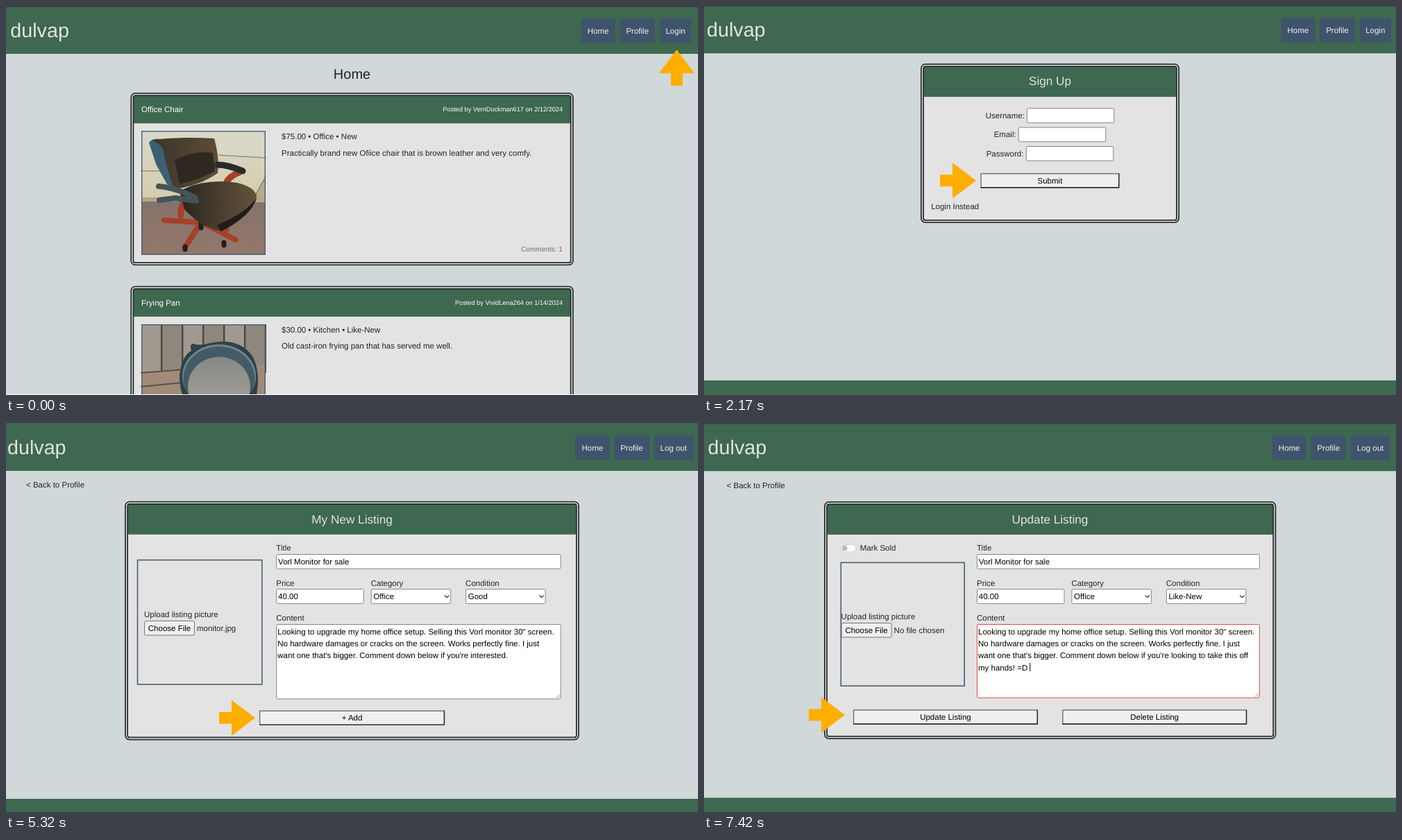
Animation of 997 by 561 pixels, one loop 8000 ms. Source, as an HTML page:

```html
<!DOCTYPE html>
<html lang="en">
<head>
<meta charset="utf-8">
<title>Marketplace walkthrough</title>
<style>
  html, body { margin: 0; width: 100%; height: 100%; overflow: hidden; background: #d0d8d9; }
  svg { display: block; width: 100%; height: 100%; }
  text { font-family: "Liberation Sans", Arial, sans-serif; text-rendering: geometricPrecision; white-space: pre; }
  .status { font-family: Inter, sans-serif; }
</style>
</head>
<body>
<svg id="stage" viewBox="0 0 997 561"></svg>
<script>
const GREEN = '#3e684f', SLATE = '#3f546c', PALE = '#e3e3e3', INK = '#212529', GREY = '#757575', EDGE = '#2b2e31';
const BODY = 11.5, SMALL = 9.2, TITLE = 17.2, HEADING = 20, MIDDLE = 498.5;

// Drawing primitives
const escape = s => s.replace(/&/g, '&amp;').replace(/</g, '&lt;');
const text = (s, x, y, { size = BODY, fill = INK, anchor = 'start', cls = '' } = {}) =>
  `<text x="${x}" y="${y}" font-size="${size}" fill="${fill}" text-anchor="${anchor}" class="${cls}">${escape(s)}</text>`;
const centred = (s, x, y, size = BODY, fill = INK) => text(s, x, y, { size, fill, anchor: 'middle' });
const rightText = (s, x, y, size, fill) => text(s, x, y, { size, fill, anchor: 'end' });
const lines = (rows, x, y, style) => rows.map((s, i) => text(s, x, y + i * 17.3, style)).join('');
const rect = (x, y, w, h, fill, extra = '') =>
  `<rect x="${x}" y="${y}" width="${w}" height="${h}" fill="${fill}" ${extra}/>`;
const frame = (x, y, w, h, stroke, width, fill = 'none', r = 0) =>
  rect(x + width / 2, y + width / 2, w - width, h - width, fill, `stroke="${stroke}" stroke-width="${width}" rx="${r}"`);
const shape = (d, fill) => `<path d="${d}" fill="${fill}"/>`;
const line = (d, stroke, width) =>
  `<path d="${d}" fill="none" stroke="${stroke}" stroke-width="${width}" stroke-linecap="round" stroke-linejoin="round"/>`;
const ellipse = (cx, cy, rx, ry, fill) => `<ellipse cx="${cx}" cy="${cy}" rx="${rx}" ry="${ry}" fill="${fill}"/>`;
const gradient = (id, from, to, dir = 'x2="0" y2="1"') =>
  `<linearGradient id="${id}" ${dir}><stop stop-color="${from}"/><stop offset="1" stop-color="${to}"/></linearGradient>`;

const arrow = (x, y, angle = 0) =>
  `<path transform="translate(${x} ${y}) rotate(${angle})" d="M0 0L-34 -25.7V-8.5H-52V8.5H-34V25.7Z" fill="#ffae00"/>`;

// Page furniture
function page({ header, logoX, navRight, footer, account = 'Log out', topLine = 0 }) {
  const links = [[account, account === 'Login' ? 45.5 : 56.5], ['Profile', 50.5], ['Home', 49]];
  let out = rect(0, 0, 997, 561, '#d0d8d9') + rect(0, 0, 997, header, GREEN) + rect(0, 0, 997, topLine, '#3a403d');
  out += text('dulvap', logoX, header - 24.2, { size: 28.7, fill: PALE });
  let right = navRight;
  for (const [label, w] of links) {
    out += rect(right - w, header - 51.2, w, 35.2, SLATE) + centred(label, right - w / 2, header - 29.5, BODY, '#f0f0f0');
    right -= w + 6.8;
  }
  return out + (footer ? rect(0, footer, 997, 561 - footer, GREEN) : '');
}

const card = (x, y, w, h, headH) =>
  rect(x, y, w, h, PALE, 'rx="6"') + rect(x + 4, y + 4, w - 8, headH, GREEN, 'rx="2"') +
  frame(x, y, w, h, EDGE, 1.8, 'none', 6) + frame(x + 3.2, y + 3.2, w - 6.4, h - 6.4, EDGE, 1.8, 'none', 3);

const button = (label, x, y, w, h = 21.7) =>
  rect(x, y, w, h, '#efefef') + line(`M${x + .8} ${y + h - 1}V${y + .8}H${x + w - 1}`, '#767676', 1.5) +
  line(`M${x + 1} ${y + h - .8}H${x + w - .8}V${y + 1}`, '#2d2d2d', 1.6) +
  centred(label, x + w / 2, y + 14.9, BODY, '#000');

const field = (x, y, w, h = 21.7, value = '', fill = '#000', stroke = '#858585') =>
  frame(x, y, w, h, stroke, 1, '#fff', 1.8) + text(value, x + 2.8, y + 14.9, { fill });

const select = (x, y, value) =>
  field(x, y, 115.5) + text(value, x + 3.6, y + 14.9, { fill: '#000' }) +
  line(`M${x + 106.5} ${y + 9.6}l2.9 2.9l2.9 -2.9`, '#222', 1.2);

const fileChooser = (x, y, chosen) =>
  text('Upload listing picture', x, y) + frame(x, y + 5, 73, 21.5, '#767676', 1, '#efefef', 2) +
  centred('Choose File', x + 36.5, y + 19.8, BODY, '#000') + text(chosen, x + 76, y + 19.8);

// x, y: left edge and baseline of the first label
function listingForm(x, y, w, areaH, v) {
  const fill = v.filled ? '#000' : GREY, right = x + w, bottom = y + 106 + areaH;
  return text('Title', x, y) + field(x, y + 5, w, 21.7, v.title, fill) +
    text('Price', x, y + 50.6) + field(x, y + 55.2, 126.5, 21.7, v.price, fill) +
    text('Category', x + 136.4, y + 50.6) + select(x + 136.4, y + 55.2, v.category) +
    text('Condition', x + 272.8, y + 50.6) + select(x + 272.8, y + 55.2, v.condition) +
    text('Content', x, y + 101.2) + field(x, y + 106, w, areaH, '', fill, v.outline) +
    lines(v.content, x + 2, y + 120.6, { fill }) +
    line(`M${right - 7} ${bottom - 2}l5 -5M${right - 4} ${bottom - 2}l2 -2`, '#666', .7);
}

const listing = ({ x, y, w, h, bodyX, size = BODY, title, by, price, about, comments, picture }) =>
  card(x, y, w, h, 40.3) + text(title, x + 15.7, y + 28, { size, fill: '#fff' }) +
  rightText(by, x + w - 15.7, y + 27.2, SMALL, '#fff') + picture +
  text(price, bodyX, y + 67.3, { size }) + lines(about, bodyX, y + 90.5, { size }) +
  rightText(`Comments: ${comments}`, x + w - 16, y + h - 20.3, 10.05, '#6a7074');

const loginRow = (label, x, y, fieldX) => text(label, x, y) + field(fieldX, y - 14.8, 126.5);

// Pictures, reduced to flat shapes
const chair = () =>
  rect(195, 180, 179, 104, 'url(#wall)') + rect(195, 282, 179, 77, 'url(#carpet)') +
  shape('M307 182H374V217L307 214Z', '#d9d8c6') + line('M307 215L374 219M195 238H222', '#96927e', 1.5) +
  shape('M354 283L374 246V283Z', '#b9ab8c') + line('M354 283L374 246', '#8d806c', 1.5) +
  rect(195, 276, 179, 6, '#b5a78b') +
  line('M281 312L228 309M281 312L258 348M281 312L331 337M281 312L318 322', '#a5412a', 8) +
  line('M252 302Q250 284 266 277M316 258Q320 246 336 240', '#a5412a', 9) +
  line('M281 302V320M258 347V351M314 341V345', '#241f1d', 7) +
  shape('M206 197Q211 189 228 193L246 252Q246 264 232 257L216 228Z', '#3b6072') +
  shape('M210 193Q256 188 300 191Q308 220 305 241Q278 260 242 264Q231 233 226 206Q222 199 210 193Z', 'url(#leather)') +
  shape('M243 222Q272 208 298 212L301 238Q276 252 250 256Z', '#2d2820') +
  shape('M250 267Q285 248 333 255Q362 262 361 277Q353 303 310 325Q279 318 257 293Z', 'url(#seat)') +
  shape('M361 277Q353 303 310 325L304 316Q345 299 361 277Z', '#1f1c19') +
  line('M220 260Q244 262 272 276L274 281L244 277L221 280', '#46535a', 8) +
  line('M305 229Q320 229 341 238', '#292b2b', 9) + frame(195, 180, 179, 179, '#456174', 1.4);

function pan() {
  let out = rect(195, 459, 179, 102, '#7d756b');
  for (let i = 0; i < 6; i++)
    out += rect(196 + i * 30, 459, 27, 70, i % 2 ? '#8f877d' : '#a09990') + rect(223 + i * 30, 459, 2, 70, '#4a443e');
  return out + shape('M195 528L374 517V561H195Z', '#a28a78') + line('M195 529L260 524M195 549L255 543', '#5d5046', 2) +
    shape('M250 534Q252 506 267 497Q264 489 269 487Q279 490 290 487Q335 476 355 505Q367 526 361 561H254Q250 548 250 534Z', '#2d414b') +
    ellipse(307, 534, 53, 46, '#71858b') + ellipse(307, 537, 51.5, 46, '#445a64') +
    ellipse(307, 549, 45, 43, 'url(#steel)') + frame(195, 459, 179, 120, '#456174', 1.4);
}

const monitor = () =>
  rect(198, 219.5, 181, 181, '#fff') + rect(230.5, 230.5, 115.5, 114, '#333435') +
  rect(232, 232, 112.5, 105, 'url(#screen)') + rect(281, 344.5, 14, 38, 'url(#metal)') + rect(285.5, 345, 4.5, 11, '#fff') +
  shape('M264 381H309L315 387H258Z', '#c7c7c7') + rect(258, 386, 57, 2, '#999') + frame(198, 219.5, 181, 181, '#456174', 1.5);

const defs = '<defs>' + gradient('wall', '#d9d9c9', '#d6cba9') + gradient('carpet', '#84736a', '#94776b') +
  gradient('leather', '#3b352b', '#5c4c36', '') + gradient('seat', '#292520', '#64533c', '') +
  gradient('steel', '#858a87', '#a9a49a') +
  gradient('screen', '#202122', '#000', 'x2=".7" y2=".7"') + gradient('metal', '#b5b5b5', '#e5e5e5', '') + '</defs>';

// Screens
const homePage = () =>
  page({ header: 69, logoX: 6.3, navRight: 987.3, account: 'Login', topLine: 1.5 }) +
  centred('Home', MIDDLE, 105, HEADING) +
  listing({ x: 179.3, y: 125, w: 638.5, h: 249.3, bodyX: 397, title: 'Office Chair',
    by: 'Posted by VernDockman617 on 2/12/2024', price: '$75.00 • Office • New',
    about: ['Practically brand new Ofiice chair that is brown leather and very comfy.'], comments: 1, picture: chair() }) +
  listing({ x: 179.3, y: 403.7, w: 638.5, h: 249.3, bodyX: 397, title: 'Frying Pan',
    by: 'Posted by VividLena264 on 1/14/2024', price: '$30.00 • Kitchen • Like-New',
    about: ['Old cast-iron frying pan that has served me well.'], comments: 0, picture: pan() }) +
  rect(0, 560, 997, 1, '#fff') + arrow(966.3, 63, -90);

const loginPage = () =>
  page({ header: 67, logoX: 4, navRight: 990, footer: 539.3, account: 'Login' }) +
  card(312, 82, 373, 202.5, 44) + centred('Login', MIDDLE, 113.4, TITLE, PALE) +
  loginRow('Email:', 417.7, 161, 452.8) + loginRow('Password:', 406.7, 188.4, 463.8) +
  button('Submit', 398.3, 212.6, 200.3) + text('Sign Up Instead', 327.2, 264.2) + arrow(322, 261.2);

const signUpPage = () =>
  page({ header: 68.3, logoX: 4, navRight: 990, footer: 540, account: 'Login', topLine: .8 }) +
  card(312, 83, 373, 230, 44) + centred('Sign Up', MIDDLE, 114.4, TITLE, PALE) +
  loginRow('Username:', 405.7, 162, 464.8) + loginRow('Email:', 417.7, 189.4, 452.8) +
  loginRow('Password:', 406.7, 216.8, 463.8) +
  button('Submit', 398.3, 241, 200.3) + text('Login Instead', 327.2, 292.6) + arrow(392, 251.8);

const profileTop = () => centred('My Profile', MIDDLE, 105, HEADING) + button('+ New Listing', 458, 127.2, 81);

const emptyProfile = () =>
  page({ header: 68.3, logoX: 4, navRight: 990, footer: 540.3, topLine: .8 }) + profileTop() +
  centred(`You don't have any listings yet! Click the "New Listing" button to get started.`, MIDDLE, 197, 14.35) +
  arrow(447.3, 138.2);

const newListing = (dx, dy, values, chosen) =>
  page({ header: 67 + dy, logoX: 3 + dx, navRight: 991 + dx, footer: 540 + dy }) +
  text('< Back to Profile', 30 + dx, 91.3 + dy) +
  `<g transform="translate(0 ${dy})">` +
  card(171, 110.8, 655, 344.7, 44) + centred('My New Listing', MIDDLE, 142.7, TITLE, PALE) +
  frame(188.7, 194.8, 181, 181, '#456174', 1.6) + fileChooser(199, 278, chosen) +
  listingForm(389.3, 182, 410.5, 108.5, values) + button('+ Add', 364.8, 412.4, 267.4) + '</g>';

const blankListing = () => newListing(0, 0, {
  title: 'Enter listing title', price: 'EX: 10.50', category: 'Bathroom', condition: 'New', content: ['Enter listing content']
}, 'No file chosen');

const filledListing = () => newListing(-1, 2, {
  filled: true, title: 'Vorl Monitor for sale', price: '40.00', category: 'Office', condition: 'Good',
  content: ['Looking to upgrade my home office setup. Selling this Vorl monitor 30" screen.',
    'No hardware damages or cracks on the screen. Works perfectly fine. I just',
    "want one that's bigger. Comment down below if you're interested."]
}, 'monitor.jpg') + arrow(359, 425.2);

const profileWithListing = () =>
  page({ header: 68.3, logoX: 1, navRight: 992.5, footer: 542.7 }) + profileTop() +
  listing({ x: 182, y: 164, w: 633.2, h: 252, bodyX: 398, size: 11.58, title: 'Vorl Monitor for sale',
    by: 'Posted by RoomyMab on 2/23/2024', price: '$40.00 • Office • Good',
    about: ['Looking to upgrade my home office setup. Selling this Vorl monitor 30"',
      'screen. No hardware damages or cracks on the screen. Works perfectly fine. I',
      "just want one that's bigger. Comment down below if you're interested."],
    comments: 0, picture: monitor() }) +
  rect(-4, 548.5, 117.5, 20, '#262b29', 'rx="3"') +
  text('site:5720/account/revise/8', 108, 560, { size: 8.6, fill: '#e8e8e8', anchor: 'end', cls: 'status' }) +
  arrow(179, 285.5);

const updateListing = () =>
  page({ header: 69.3, logoX: 5.6, navRight: 988.3, footer: 540.5, topLine: 1.6 }) +
  text('< Back to Profile', 32.6, 93.7) +
  card(173, 113, 651.3, 343, 44) + centred('Update Listing', MIDDLE, 144.8, TITLE, PALE) +
  frame(196.7, 174.8, 22.5, 11.5, '#bfc1c3', .8, '#fff', 5.5) + ellipse(202.6, 180.5, 4, 4, '#bcbcbc') +
  text('Mark Sold', 224.7, 184.4) +
  frame(196.5, 200.5, 179.5, 179.5, '#456174', 1.6) + fileChooser(197.6, 283, 'No file chosen') +
  listingForm(393, 184, 407.8, 106.8, {
    filled: true, title: 'Vorl Monitor for sale', price: '40.00', category: 'Office', condition: 'Like-New', outline: '#e04a4a',
    content: ['Looking to upgrade my home office setup. Selling this Vorl monitor 30" screen.',
      'No hardware damages or cracks on the screen. Works perfectly fine. I just',
      "want one that's bigger. Comment down below if you're looking to take this off",
      'my hands! =D']
  }) + rect(469.3, 346, 1, 12, '#000') +
  button('Update Listing', 214.8, 413.2, 266.3) + button('Delete Listing', 516, 413.2, 266.3) + arrow(203, 421);

// Each screen with the time at which it appears
const LOOP = 8000;
const screens = [
  [0, homePage], [1120, loginPage], [2170, signUpPage], [3220, emptyProfile],
  [4270, blankListing], [5320, filledListing], [6370, profileWithListing], [7420, updateListing]
];
const stage = document.getElementById('stage');
stage.innerHTML = defs + screens.map(([, draw]) => `<g class="screen">${draw()}</g>`).join('');
const groups = [...stage.querySelectorAll('.screen')];
const start = performance.now();

function render() {
  const t = (performance.now() - start) % LOOP;
  const current = screens.filter(([begin]) => begin <= t).length - 1;
  groups.forEach((g, i) => { g.style.display = i === current ? '' : 'none'; });
  requestAnimationFrame(render);
}
render();
</script>
</body>
</html>
```
